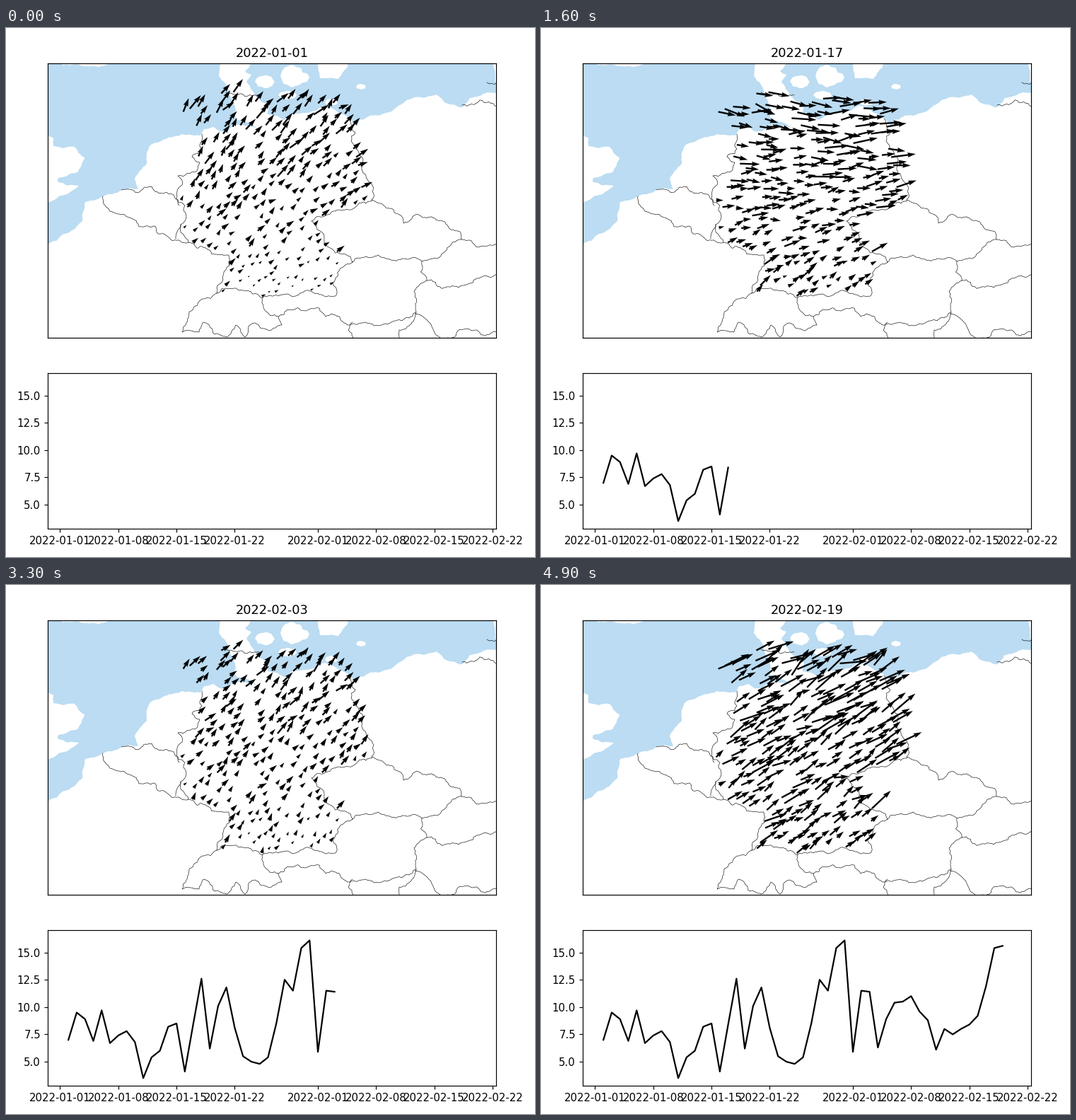
Recreate the animation shown at these times as a matplotlib script. Size 748 by 748 pixels, loop 5000 ms.

```python
import numpy as np
import matplotlib.pyplot as plt
from matplotlib.animation import FuncAnimation
from matplotlib.path import Path

SIZE, DAYS = 748, 50
SEA = "#bbdcf2"
START = np.datetime64("2022-01-01")
rng = np.random.default_rng(7)

plt.rcParams["font.family"] = "DejaVu Sans"
fig = plt.figure(figsize=(7, 7), dpi=SIZE / 7, facecolor="white")


def pixel_axes(left, top, right, bottom):
    return fig.add_axes([left / SIZE, 1 - bottom / SIZE,
                         (right - left) / SIZE, (bottom - top) / SIZE])


def fractal(points, rough):
    """Displace midpoints until every piece of the path is short."""
    z = [complex(*p) for p in points]
    while max(abs(np.diff(z))) > 4:
        finer = z[:1]
        for a, b in zip(z, z[1:]):
            if abs(b - a) > 4:
                finer.append((a + b) / 2 + 1j * (b - a) * rng.uniform(-rough, rough))
            finer.append(b)
        z = finer
    return np.real(z), np.imag(z)


def area(color, *points):
    map_ax.fill(*fractal(points + points[:1], 0.1), color=color, lw=0, zorder=1)


def border(*points):
    map_ax.plot(*fractal(points, 0.2), color="black", lw=0.4, zorder=2)


def island(x, y, rx, ry):
    turn = np.linspace(0, 2 * np.pi, 9)[:-1]
    area("white", *zip(x + rx * np.cos(turn), y + ry * np.sin(turn)))


# Map, drawn in stage pixels
LEFT, RIGHT = 59.4, 693.3
map_ax = pixel_axes(LEFT, 50, RIGHT, 438)
map_ax.set(xlim=(LEFT, RIGHT), ylim=(438, 50), xticks=[], yticks=[])

# North Sea and Channel
area(SEA, (50, 40), (308, 40), (301, 68), (311, 80), (317, 97), (324, 113), (326, 130),
     (356, 143), (324, 137), (313, 146), (302, 146), (294, 140), (280, 143), (274, 152),
     (250, 150), (225, 157), (203, 167), (199, 192), (182, 214), (187, 228), (163, 229),
     (137, 238), (112, 246), (108, 273), (82, 291), (59, 306), (50, 308))
# Baltic
area(SEA, (345, 40), (346, 50), (338, 61), (347, 66), (340, 76), (350, 91), (360, 103),
     (372, 110), (370, 122), (393, 130), (406, 121), (428, 120), (448, 110), (467, 117),
     (485, 127), (497, 139), (499, 131), (530, 123), (548, 116), (562, 106), (577, 98),
     (608, 94), (620, 105), (645, 112), (656, 99), (681, 91), (700, 92), (691, 74),
     (690, 40), (484, 40), (483, 55), (470, 72), (444, 71), (440, 40))
# Danish islands, Bornholm, Sweden's neighbours and Britain
island(366, 76, 14, 9)
island(405, 68, 17, 16)
island(418, 70, 11, 8)
island(398, 95, 13, 6)
island(460, 105, 9, 5)
island(502, 83, 7, 4)
area("white", (50, 148), (67, 156), (67, 167), (97, 168), (111, 183), (101, 204), (74, 212),
     (73, 217), (103, 223), (88, 234), (66, 244), (50, 250))

# Germany's border, used for drawing and for placing stations
west = [(277, 150), (274, 178), (263, 182), (274, 190), (270, 202), (243, 209), (249, 222),
        (241, 240), (255, 266), (247, 278), (258, 303), (285, 313), (315, 321), (298, 375)]
alps = [(298, 375), (335, 371), (363, 381), (385, 379), (405, 380), (440, 375), (466, 379),
        (462, 360), (490, 331)]
east = [(490, 331), (450, 295), (432, 273), (455, 264), (500, 247), (517, 245), (505, 205),
        (505, 186), (488, 160), (494, 148), (485, 128)]
waters = [(461, 98), (360, 98), (309, 85), (248, 117)]
for part in west, alps, east:
    border(*part)

# Neighbouring borders, roughly north to south
border((311, 91), (325, 94), (358, 95))
border((645, 109), (694, 111))
border((680, 77), (694, 78))
border((163, 229), (190, 231), (206, 224), (238, 238), (245, 251))
border((137, 238), (160, 263), (188, 281), (210, 280), (215, 291), (258, 303))
border((247, 278), (240, 298))
border((517, 243), (545, 255), (562, 276), (579, 264), (615, 272), (643, 290), (644, 299),
       (668, 310), (694, 305))
border((644, 299), (615, 322), (588, 330), (560, 326), (526, 321), (490, 331))
border((588, 330), (595, 357), (640, 367), (665, 354), (694, 348))
border((595, 357), (577, 372), (580, 402), (550, 414), (520, 421), (452, 408), (443, 396),
       (385, 408), (366, 399), (363, 381))
border((298, 375), (278, 383), (262, 400), (249, 430), (273, 430), (280, 416), (295, 433),
       (311, 437), (325, 420), (338, 437), (352, 417), (372, 428), (390, 420), (385, 408))
border((490, 416), (484, 427), (491, 438))
border((580, 402), (571, 420), (556, 427), (556, 438))
border((578, 404), (602, 422), (608, 434), (694, 430))

# Weather stations: windy peaks first, then an even random scatter
peaks = [(384, 210), (468, 316), (310, 364), (316, 334)]
country = Path(west + alps + east + waters)
stations = list(peaks)
for spot in rng.uniform((245, 85), (520, 382), (6000, 2)):
    gap = np.hypot(*(np.array(stations) - spot).T).min()
    if len(stations) < 250 and gap > 9 and country.contains_point(spot):
        stations.append(tuple(spot))
px, py = np.array(stations).T

# Screen wind (right + up * j) at the north-west, north-east and south on key days
WIND = {
    0: (10 + 16j, 13 + 11j, 4 + 3j),
    9: (6 + 6j, 5j, 3 - 2j),
    16: (23 - 5j, 28 + 1j, 9 + 7j),
    24: (7 + 2j, 13 + 3j, 4j),
    33: (11 + 11j, 11 + 11j, 4 + 6j),
    40: (16 + 7j, 11 + 9j, 10 + 7j),
    49: (26 + 14j, 30 + 17j, 14 + 9j),
}
key_days = list(WIND)
anchors = np.array(list(WIND.values())).T
south = (py - 115) / 255
eastward = (px - 270) / 210
shares = np.array([(1 - south) * (1 - eastward), (1 - south) * eastward, south])
gain = np.exp(rng.normal(0, 0.22, len(px)))
gain[:len(peaks)] = 1.8

# Charted speed for each day from the second on
SPEED = [7, 9.5, 8.9, 6.9, 9.7, 6.7, 7.4, 7.8, 6.8, 3.5, 5.4, 6, 8.2, 8.5, 4.1, 8.4, 12.6,
         6.2, 10.1, 11.8, 8.1, 5.5, 5, 4.8, 5.4, 8.5, 12.5, 11.5, 15.4, 16.1, 5.9, 11.5,
         11.4, 6.3, 8.9, 10.4, 10.5, 11, 9.6, 8.8, 6.1, 8, 7.5, 8, 8.4, 9.2, 11.9, 15.4, 15.6]
by_day = np.array(SPEED[:1] + SPEED)


def wind(day):
    flow = np.array([np.interp(day, key_days, a) for a in anchors]) @ shares
    usual = np.interp(day, key_days, by_day[key_days])
    turn = np.random.default_rng(day).normal(0, 0.15, len(px))
    flow = flow * gain * np.sqrt(by_day[day] / usual) * np.exp(1j * turn)
    return flow.real, flow.imag


arrows = map_ax.quiver(px, py, *wind(0), color="black", angles="uv",
                       scale_units="x", scale=1, width=0.0037, zorder=3)
title = map_ax.set_title(str(START), fontsize=12)

# Speed chart
chart = pixel_axes(LEFT, 488, RIGHT, 707.6)
chart.set(xlim=(-1.45, 52.45), ylim=(2.83, 17.04), yticks=np.arange(5, 16, 2.5))
ticks = [first + week for first in (0, 31) for week in range(0, 22, 7)]
chart.set_xticks(ticks, [str(START + d) for d in ticks])
line, = chart.plot([], [], color="black", lw=1.5)


def update(day):
    arrows.set_UVC(*wind(day))
    title.set_text(str(START + day))
    line.set_data(range(1, day + 1), SPEED[:day])
    return arrows, title, line


anim = FuncAnimation(fig, update, frames=DAYS, interval=100, repeat=True)
plt.show()
```
